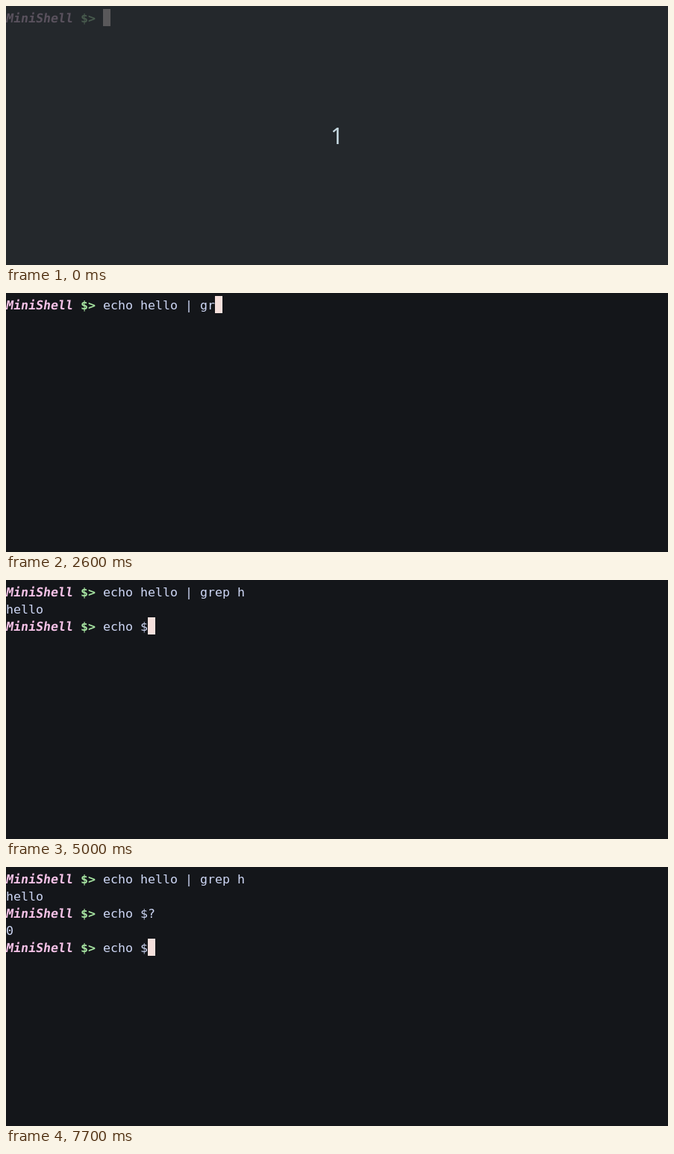
These frames come from a looping animation (887x347 px, 8 s). An HTML page:

```html
<!DOCTYPE html>
<html lang="en">
<head>
<meta charset="utf-8">
<title>Shell session</title>
<style>
  html, body { margin: 0; width: 100%; height: 100%; overflow: hidden; background: #14161a; }
  #screen {
    position: absolute; top: 4px; left: 0;
    font: 16.61px/25px "DejaVu Sans Mono", monospace;
    color: #cdd6f4; white-space: pre;
  }
  #screen div { height: 23px; }
  #screen b { color: #a6e3a1; }
  #screen .name { display: inline-block; color: #f5c2e7; transform: skewX(-9deg); }
  #screen i { display: inline-block; width: 10px; height: 23px; vertical-align: top; background: #f5e0dc; }
  #intro {
    position: absolute; inset: 0;
    background: rgba(41, 46, 50, .76); color: #c5d8e0;
    font: 30px/347px "Noto Sans", sans-serif; text-align: center;
  }
</style>
</head>
<body>
<div id="screen"></div>
<div id="intro">1</div>
<script>
const LOOP = 8000;
const PROMPT = '<b class="name">MiniShell</b> <b>$&gt;</b> ';
const screenEl = document.getElementById('screen');
const intro = document.getElementById('intro');

// keys: the time each character is typed; enter: when the command runs
const commands = [
  { text: 'echo hello | grep h', output: 'hello', enter: 3200,
    keys: [200, 300, 500, 600, 700, 900, 1000, 1100, 1200, 1500, 1500,
           2000, 2300, 2400, 2600, 2700, 2800, 2900, 3000] },
  { text: 'echo $?', output: '0', enter: 5600,
    keys: [4200, 4300, 4400, 4500, 4600, 5000, 5100] },
  { text: 'echo $', output: '', enter: Infinity,
    keys: [7000, 7100, 7200, 7200, 7300, 7700] }
];
const cursorOff = [[3800, 4100], [6100, 6600]];

const row = html => `<div>${html}</div>`;

function render(t) {
  let html = '';
  for (const { text, output, enter, keys } of commands) {
    const typed = text.slice(0, keys.filter(k => k <= t).length);
    if (t < enter) {
      const hidden = cursorOff.some(([from, to]) => t >= from && t < to);
      html += row(PROMPT + typed + (hidden ? '' : '<i></i>'));
      break;
    }
    html += row(PROMPT + typed) + row(output);
  }
  return html;
}

let shown = '';
function frame() {
  const t = performance.now() % LOOP;
  const html = render(t);
  if (html !== shown) screenEl.innerHTML = shown = html;
  intro.hidden = t >= 100;
  requestAnimationFrame(frame);
}
frame();
</script>
</body>
</html>
```
